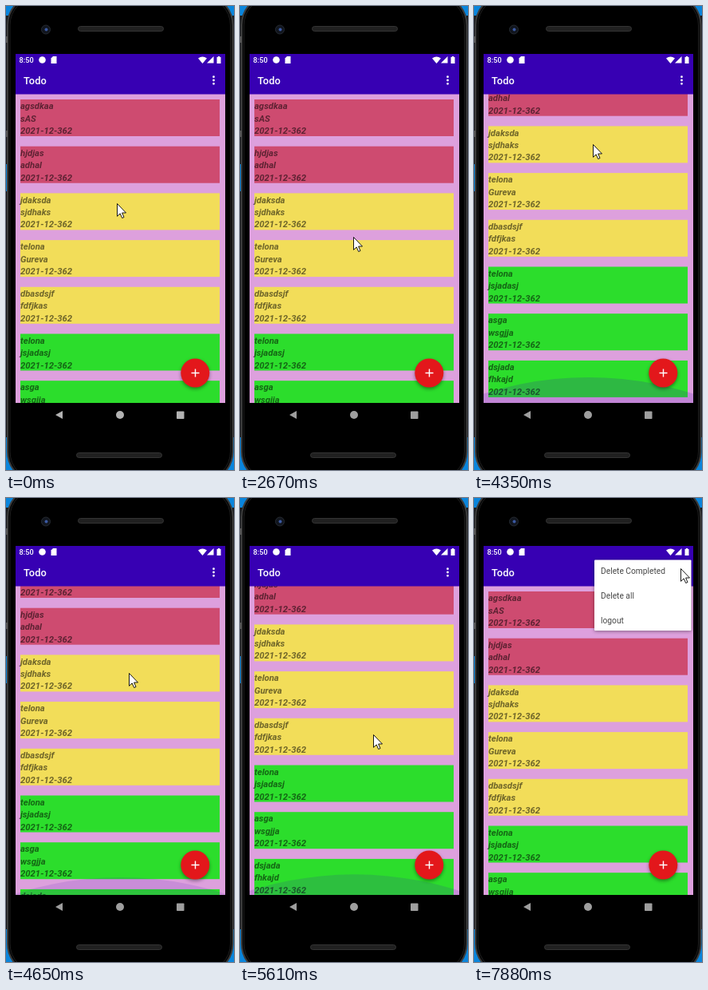
Animation, 286 px wide and 581 px high, one loop 8 s. Source, as an HTML page:

```html
<!DOCTYPE html>
<html lang="en">
<head>
<meta charset="utf-8">
<title>Todo list</title>
<style>
  html, body { margin: 0; width: 100%; height: 100%; overflow: hidden; background: #111; }
  svg { display: block; width: 100vw; height: 100vh; font-family: Roboto, sans-serif; }
  .card text { font: italic 700 11.3px Roboto, sans-serif; fill: #000; fill-opacity: .54; }
  .menu text { font-size: 10.24px; fill: #484848; }
  .menu rect { filter: drop-shadow(0 1.5px 2px rgba(0, 0, 0, .4)); }
  .fab circle { filter: drop-shadow(0 2px 2px rgba(0, 0, 0, .4)); }
</style>
</head>
<body>
<svg viewBox="0 0 286 581">
  <defs>
    <clipPath id="view"><rect x="12" y="110" width="263" height="387"/></clipPath>
  </defs>

  <!-- phone body -->
  <rect width="286" height="581" fill="#0a85dc"/>
  <path d="M0 12H3V198H0ZM0 232H3V540H0ZM284 12h2V540h-2Z" fill="#17191c"/>
  <rect x="2" y="-14" width="282.500" height="610" rx="38" fill="#080808" stroke="#3c3c3c" stroke-width="2"/>
  <rect x="5" y="-11" width="276.500" height="604" rx="35" fill="#000" stroke="#1d1d1d"/>
  <path d="M1 38v8M1 156v8" stroke="#555" stroke-width="2"/>
  <g fill="#202020" stroke="#343434">
    <rect x="90.500" y="25.500" width="107" height="6" rx="3"/>
    <rect x="88.500" y="559.500" width="107" height="6" rx="3"/>
  </g>
  <circle cx="50" cy="29.500" r="5.500" fill="#11151d" stroke="#252a30"/>
  <circle cx="50.500" cy="29.500" r="2" fill="#3a58a0"/>

  <!-- list -->
  <g clip-path="url(#view)">
    <rect x="12" y="110" width="263" height="387" fill="#dda0dd"/>
    <g id="list"></g>
    <circle id="glow" cx="143.500" fill="#3700b3"/>
  </g>

  <!-- status and app bar -->
  <rect x="12" y="60" width="263" height="50.500" fill="#3700b3"/>
  <g fill="#fff">
    <text x="16.500" y="71" font-size="9.200" font-weight="500">8:50</text>
    <circle cx="45.500" cy="67.500" r="4.300"/>
    <path d="M59 63h4.500v9h-7v-6.500Z"/>
    <path d="M241 65.500q5.500 -4 11 0l-5.500 6.500ZM260.500 63v8.500h-8.500ZM264.500 64h1.300v-1h2.400v1h1.300v8h-5Z"/>
    <text x="22" y="98" font-size="12.800" font-weight="500" letter-spacing=".2">Todo</text>
    <path d="M260.500 88.700v8.700" stroke="#fff" stroke-width="2.800" stroke-linecap="round" stroke-dasharray="0 4.300"/>
  </g>

  <g id="nav">
    <path d="M62 512l9 -5v10Z"/>
    <circle cx="143" cy="512" r="5"/>
    <rect x="214" y="507.500" width="9.500" height="9.500" rx=".8"/>
  </g>

  <g class="fab">
    <circle cx="237.300" cy="459.500" r="18" fill="#e3171b"/>
    <path d="M232.500 459.500h10M237.500 454.500v10" stroke="#fff" stroke-width="1.400"/>
  </g>

  <g class="menu" id="menu">
    <rect x="151" y="77.500" width="121.500" height="88.500" rx="1" fill="#fff"/>
    <text x="159" y="95">Delete Completed</text>
    <text x="159" y="126">Delete all</text>
    <text x="159" y="157">logout</text>
  </g>

  <path id="cursor" d="M.500 .500V16.300L4.200 12.900L6.700 18.500L9 17.500L6.600 12H11.500Z" fill="#fff" stroke="#000" stroke-width=".9"/>
</svg>

<script>
const LOOP = 8000, TICK = 120, PHASE = 30;
const PITCH = 58.7, MAX_SCROLL = 84;
const TOP = 110, BOTTOM = 497, GLOW_R = 430, GLOW_DEPTH = 32;
const $ = id => document.getElementById(id);
const clamp = (v, lo, hi) => Math.min(hi, Math.max(lo, v));
const ease = u => (1 - Math.cos(Math.PI * u)) / 2;

const RED = '#ce4b70', YELLOW = '#f2dd59', GREEN = '#2cdd2c';
const todos = [
  [RED, 'agsdkaa', 'sAS'], [RED, 'hjdjas', 'adhal'],
  [YELLOW, 'jdaksda', 'sjdhaks'], [YELLOW, 'telona', 'Gureva'], [YELLOW, 'dbasdsjf', 'fdfjkas'],
  [GREEN, 'telona', 'jsjadasj'], [GREEN, 'asga', 'wsgjja'], [GREEN, 'dsjada', 'fhkajd']
];
$('list').innerHTML = todos.map(([color, ...lines], i) =>
  `<g class="card" transform="translate(18 ${117 + i * PITCH})">
    <rect width="250" height="46" fill="${color}"/>
    ${[...lines, '2021-12-362'].map((s, n) => `<text y="${12.2 + n * 15.4}">${s}</text>`).join('')}
  </g>`).join('');

// The pointer rests between gestures
const gestures = [];
const gesture = held => (start, end, x, y) => gestures.push({ held, start, end, x, y });
const move = gesture(false), drag = gesture(true);

move(150, 420, 168, 334);
move(690, 1470, 146, 302);
move(2120, 2390, 142, 289);
drag(2670, 2960, 145, 170);
drag(2960, 3440, 135, 386);
drag(3440, 4080, 149, 173);
drag(4350, 4880, 161, 282);
drag(4880, 5310, 167, 180);
move(5310, 5440, 167, 288);
drag(5440, 6000, 172, 374);
move(6000, 6240, 266, 175);
move(6510, 7080, 259, 88);

// Replays the gestures up to t: drags scroll the list, pulling past an edge lights it
function replay(t) {
  let x = 139, y = 247, scroll = 0, glow = 0, atTop = true;
  for (const g of gestures) {
    if (t < g.start) break;
    const u = clamp((t - g.start) / (g.end - g.start), 0, 1);
    const dx = (g.x - x) * ease(u), dy = (g.y - y) * ease(u);
    x += dx;
    y += dy;
    if (!g.held) {
      glow = Math.max(0, glow - (t - g.start < g.end - g.start ? t - g.start : g.end - g.start) / 900);
      continue;
    }
    const wanted = scroll - dy;
    scroll = clamp(wanted, 0, MAX_SCROLL);
    const pull = Math.abs(wanted - scroll);
    if (pull) {
      atTop = wanted < 0;
      glow = Math.min(1, pull / 15);
    } else {
      glow = Math.max(0, glow - Math.abs(dy) / 150);
    }
  }
  return { x, y, scroll, glow, atTop };
}

function draw(now) {
  const t = now % LOOP;
  const { x, y, scroll, glow, atTop } = replay(Math.floor((t - PHASE) / TICK) * TICK + PHASE);
  const reach = GLOW_R - GLOW_DEPTH * glow;
  $('cursor').setAttribute('transform', `translate(${Math.round(x)} ${Math.round(y)})`);
  $('list').setAttribute('transform', `translate(0 ${-Math.round(scroll)})`);
  $('glow').setAttribute('r', GLOW_R);
  $('glow').setAttribute('cy', atTop ? TOP - reach : BOTTOM + reach);
  $('glow').setAttribute('opacity', .17 * glow);
  $('nav').setAttribute('fill', t < 420 ? '#b2b2b2' : '#9e9e9e');
  $('menu').setAttribute('opacity', clamp(Math.floor((t - 7640) / TICK + 1) / 3, 0, 1));
  requestAnimationFrame(draw);
}
requestAnimationFrame(draw);
</script>
</body>
</html>
```
